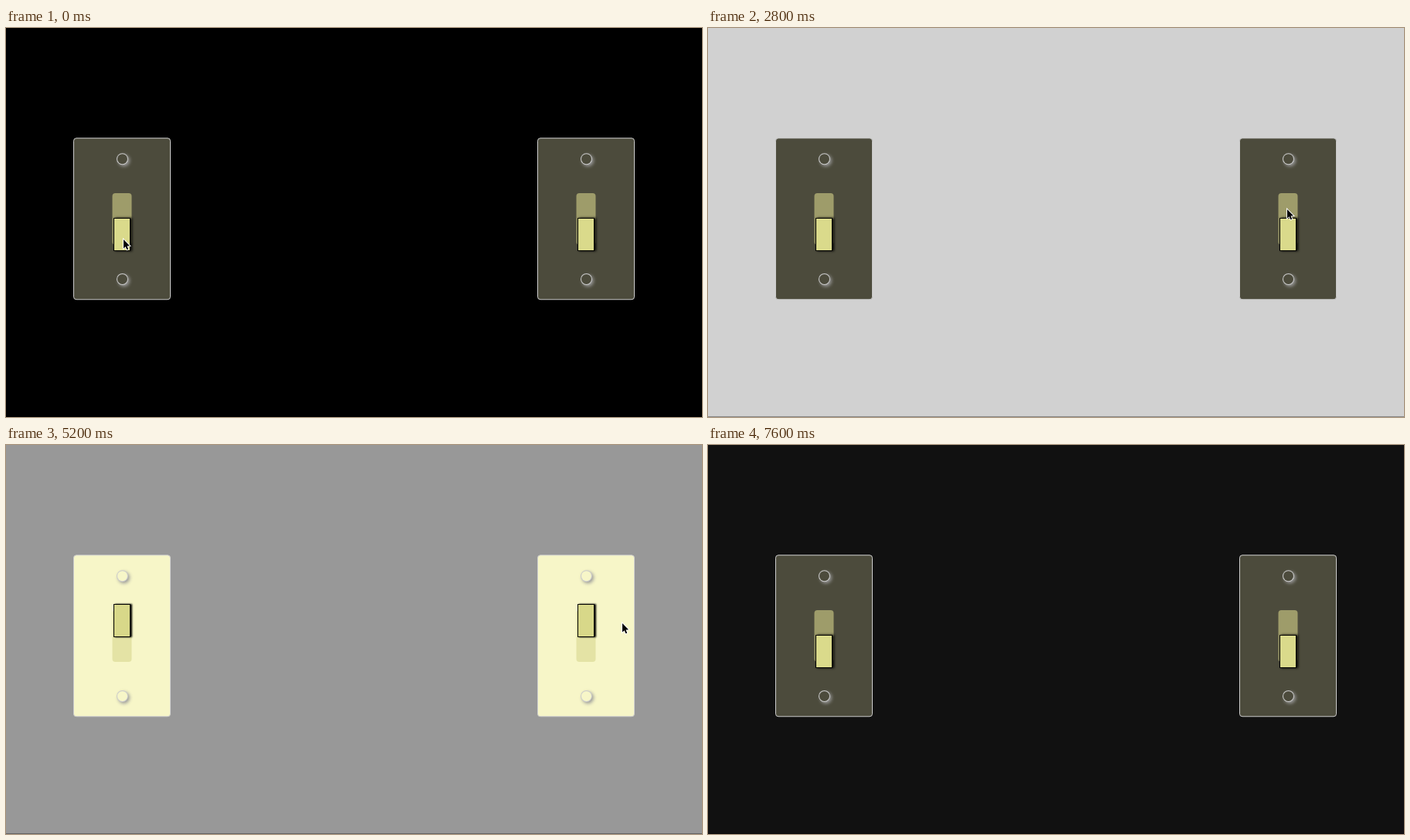
Recreate the animation shown at these times as an HTML page with a canvas. Size 900x504 px, loop 8000 ms.

```html
<!DOCTYPE html>
<html lang="en">
<head>
<meta charset="utf-8">
<title>Two light switches</title>
<style>
html, body { margin: 0; width: 100%; height: 100%; overflow: hidden; background: #000; }
canvas { display: block; }
</style>
</head>
<body>
<canvas id="stage" width="900" height="504"></canvas>
<script>
const ctx = document.getElementById('stage').getContext('2d');
const LOOP = 8000, STEP = 200, END = 7400;

// Clicks flip both switches, on first: the wall's fade starts `lead` ms ahead of the flip
const clicks = [
  { at: 537, lead: 0, dur: 2000 },
  { at: 2700, lead: 317, dur: 2817 },
  { at: 4510, lead: 0, dur: 2000 },
  { at: 6038, lead: 0, dur: 2000 }
];

// Pointer key points: time, x, y
const path = [
  [0, 152, 274], [600, 152, 274], [1000, 153, 215], [2400, 749, 235], [2800, 749, 235],
  [3600, 180, 260], [4400, 151, 262], [5200, 797, 231], [6000, 758, 228], [7200, 920, 250]
];

// CSS "ease": cubic-bezier(.25, .1, .25, 1)
function ease(x) {
  if (x >= 1) return 1;
  let lo = 0, hi = 1;
  for (let i = 0; i < 24; i++) {
    const u = (lo + hi) / 2;
    if (0.75 * u * (1 - u) + u ** 3 < x) lo = u; else hi = u;
  }
  return 0.3 * lo * (1 - lo) ** 2 + 3 * lo * lo * (1 - lo) + lo ** 3;
}

function box(x, y, w, h, r, fill, line) {
  ctx.beginPath();
  ctx.roundRect(x, y, w, h, r);
  ctx.fillStyle = fill;
  ctx.fill();
  if (line) {
    ctx.strokeStyle = line;
    ctx.stroke();
  }
}

function shadow(color, x, y, blur) {
  ctx.shadowColor = color;
  ctx.shadowOffsetX = x;
  ctx.shadowOffsetY = y;
  ctx.shadowBlur = blur;
}

function screw(x, y, fill) {
  ctx.save();
  shadow('#999', 2, 2, 4);
  box(x - 7.5, y - 7.5, 15, 15, 7.5, '#ccc');
  ctx.restore();
  box(x - 6.5, y - 6.5, 13, 13, 6.5, fill);
}

function lightSwitch(x, on) {
  const plate = on ? '#f7f6c8' : '#4c4b3c';
  box(x - 62.5, 142.75, 125, 209, 3.5, plate, '#ccc');
  screw(x + 0.5, 169.7, plate);
  screw(x + 0.5, 325.4, plate);
  box(x - 12.5, 214, 25, 67, 4, on ? '#e4e3a5' : '#9e9c6a');

  const top = on ? 206 : 246;
  ctx.save();
  shadow('#000', 2, 0, on ? 2 : 3);
  box(x - 11, top, 22, 43, 0, '#000');
  ctx.restore();
  box(x - 10, top + 1, 20, 41, 0, on ? '#d8d889' : '#dada8b');
}

function pointer([x, y]) {
  ctx.save();
  ctx.translate(x, y);
  const arrow = new Path2D('M0 0V11.5L2.6 9.2 4.4 13.2 6.2 12.4 4.5 8.4 8 8.2Z');
  ctx.strokeStyle = '#fff';
  ctx.lineWidth = 1.8;
  ctx.stroke(arrow);
  ctx.fillStyle = '#000';
  ctx.fill(arrow);
  ctx.restore();
}

function pointerAt(t) {
  const i = path.findIndex(p => p[0] > t);
  if (i < 0) return path.at(-1).slice(1);
  const [t0, x0, y0] = path[i - 1], [t1, x1, y1] = path[i];
  const p = (t - t0) / (t1 - t0), k = p * p * (3 - 2 * p);
  return [x0 + (x1 - x0) * k, y0 + (y1 - y0) * k];
}

function draw(t) {
  const count = clicks.filter(c => c.at <= t).length;
  const on = count % 2 === 1;
  let light = 0;
  if (count) {
    const { at, lead, dur } = clicks[count - 1];
    const k = ease((Math.min(t, END) - at + lead) / dur);
    light = Math.round(255 * (on ? k : 1 - k));
  }
  ctx.fillStyle = `rgb(${light},${light},${light})`;
  ctx.fillRect(0, 0, 900, 504);
  ctx.fillStyle = 'rgba(0,0,0,.35)';
  ctx.fillRect(0, 503, 900, 1);
  lightSwitch(150, on);
  lightSwitch(750, on);
  pointer(pointerAt(t));
}

const begin = performance.now();
function tick() {
  const t = (performance.now() - begin) % LOOP;
  draw(Math.floor(t / STEP) * STEP);
  requestAnimationFrame(tick);
}
tick();
</script>
</body>
</html>
```
